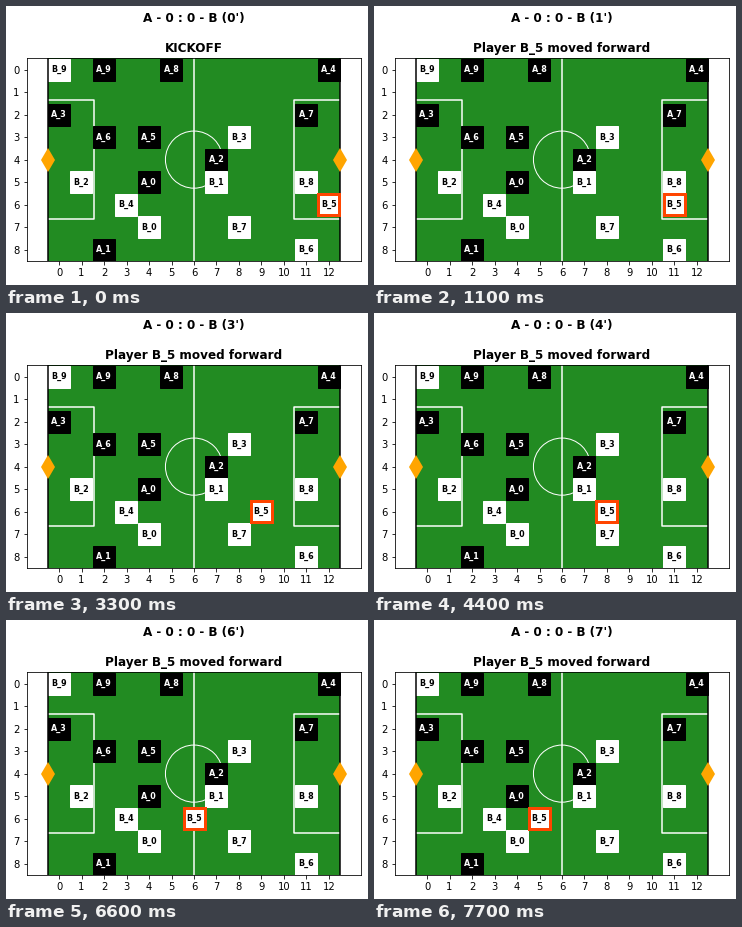
These frames come from a looping animation (362 px wide and 279 px high, 8000 ms). A matplotlib script:

```python
import matplotlib.pyplot as plt
from matplotlib.animation import FuncAnimation
from matplotlib.patches import Circle, Rectangle

W, H, DPI = 362, 279, 72
CELL = 22.49
ROWS, COLS = 9, 13
LEFT, BOTTOM = 20.6, 24.17
AX_W, AX_H = 334.8, ROWS * CELL
MID_X, MID_Y = 6, 4
STEP = 1100
TICK = 100

# (column, row) of each player
TEAM_A = [(4, 5), (2, 8), (7, 4), (0, 2), (12, 0),
          (4, 3), (2, 3), (11, 2), (5, 0), (2, 0)]
TEAM_B = [(4, 7), (7, 5), (1, 5), (8, 3), (3, 6),
          (12, 6), (11, 8), (8, 7), (11, 5), (0, 0)]
RUNNER = 5
RUNNER_SIZE = 21 / CELL

plt.rcParams["font.family"] = "DejaVu Sans"
fig = plt.figure(figsize=((W + 0.01) / DPI, (H + 0.01) / DPI), dpi=DPI,
                 facecolor="white")
ax = fig.add_axes([LEFT / W, BOTTOM / H, AX_W / W, AX_H / H])
half = AX_W / CELL / 2
ax.set_xlim(MID_X - half, MID_X + half)
ax.set_ylim(ROWS - 0.5, -0.5)
ax.set_xticks(range(COLS))
ax.set_yticks(range(ROWS))


def line(xs, ys, color="white", z=2):
    ax.plot(xs, ys, color=color, lw=1.5, zorder=z)


def draw_pitch():
    ax.add_patch(Rectangle((-0.5, -0.5), COLS, ROWS, color="forestgreen",
                           lw=0, zorder=1))
    line([MID_X, MID_X], [-0.5, ROWS - 0.5])
    ax.add_patch(Circle((MID_X, MID_Y), 1.27, fill=False, ec="white",
                        lw=1, zorder=2))
    top, bottom = MID_Y - 2.64, MID_Y + 2.64
    for goal, edge in ((-0.5, 1.54), (12.5, 10.46)):
        line([goal, edge, edge, goal], [top, top, bottom, bottom])
        line([goal, goal], [-0.5, ROWS - 0.5], "black", z=4)
        ax.plot(goal, MID_Y, "d", color="orange", ms=17.3, mew=0, zorder=8)


def add_label(name, col, row, ink, z):
    return ax.text(col, row, name, color=ink, size=8, weight="bold",
                   ha="center", va="center", zorder=z)


def add_player(name, col, row, fill, ink):
    size = 22 / CELL
    corner = col - 0.5, row - 0.48
    ax.add_patch(Rectangle(corner, size, size, fc=fill, ec=fill, lw=1,
                           zorder=3))
    add_label(name, col, row, ink, 5)


draw_pitch()
for i, (col, row) in enumerate(TEAM_A):
    add_player(f"A_{i}", col, row, "black", "white")
for i, (col, row) in enumerate(TEAM_B):
    if i != RUNNER:
        add_player(f"B_{i}", col, row, "white", "black")

start, lane = TEAM_B[RUNNER]
runner = Rectangle((start - RUNNER_SIZE / 2, lane - RUNNER_SIZE / 2),
                   RUNNER_SIZE, RUNNER_SIZE, fc="white", ec="orangered",
                   lw=3, zorder=6)
ax.add_patch(runner)
runner_label = add_label(f"B_{RUNNER}", start, lane, "black", 7)
title = ax.set_title("", size=12, weight="bold")


def update(frame):
    minute = frame * TICK // STEP
    event = f"Player B_{RUNNER} moved forward" if minute else "KICKOFF"
    title.set_text(f"A - 0 : 0 - B ({minute}')\n\n{event}")
    col = start - minute
    runner.set_x(col - RUNNER_SIZE / 2)
    runner_label.set_x(col)
    return title, runner, runner_label


anim = FuncAnimation(fig, update, frames=8000 // TICK, interval=TICK,
                     repeat=True, repeat_delay=0, blit=False)
plt.show()
```
